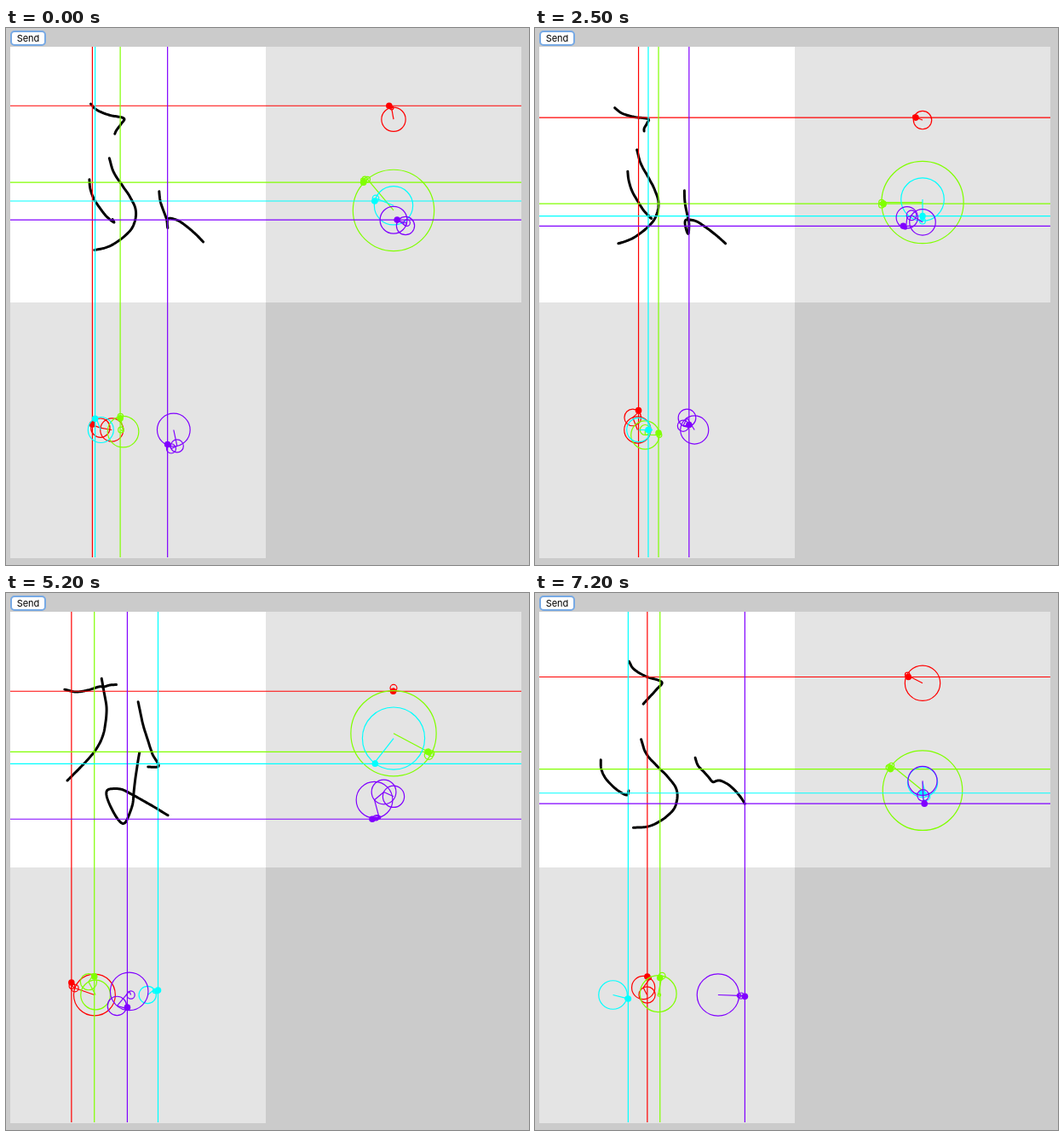
Write an HTML page with a canvas that moves like this. It is 614 px wide and 630 px high and loops after 7300 ms.

```html
<!DOCTYPE html>
<html lang="en">
<head>
<meta charset="utf-8">
<title>Stroke epicycles</title>
<style>
  html, body { margin: 0; width: 100%; height: 100%; overflow: hidden; background: #cbcbcb; }
  canvas { position: absolute; left: 0; top: 0; }
  button {
    position: absolute; left: 5px; top: 3px; width: 42px; height: 18px;
    box-sizing: border-box; margin: 0; padding: 0;
    border: 2px solid #77a9e4; border-radius: 5px; outline: none;
    background: #fff; color: #000;
    font: 11px/14px Inter, sans-serif; text-align: center;
  }
</style>
</head>
<body>
<canvas id="stage" width="614" height="630"></canvas>
<button type="button">Send</button>
<script>
const ctx = document.getElementById('stage').getContext('2d');

const STEP = 100, STEPS = 73;
const ORDER = 20, SAMPLES = 160;
const LEFT = 5, TOP = 22, SIDE = 300;
const MID_X = LEFT + SIDE * 1.5, MID_Y = TOP + SIDE * 1.5 - 0.5;
const TAU = Math.PI * 2;

// Pen phases in degrees at these times; each stroke is traced forth and back.
const TIMES = [0, 1, 2.5, 3.5, 5.2, 6.1, 7.2];

// Two poses per stroke as flat x, y lists, evenly spaced along the stroke.
const STROKES = [
  { hue: 0,
    phase: [10, 513, 1149, 1478, 2179, 2570, 2943],
    from: [120,72, 124,83, 138,94, 158,103, 149,114, 135,128, 126,136],
    to: [68,113, 82,116, 96,114, 109,110, 115,110, 122,108, 130,107.5] },
  { hue: 90,
    phase: [40, 183, 450, 618, 962, 1070, 1131],
    from: [127,187, 134,205, 149,219, 166,232, 179,247, 178,267, 164,281, 145,289, 124,288],
    to: [112,99, 115,116, 118,134, 117,151, 113.5,168, 106,183, 95.5,196, 83,209, 71,221] },
  { hue: 180,
    phase: [68, 380, 900, 1228, 1582, 1671, 1994],
    from: [59,211, 59,221.5, 63.5,230.5, 72,238, 81,242.5, 91,245, 97,238],
    to: [155,127, 157.5,139, 161,155, 166,171, 172,189, 179,203, 166,204] },
  { hue: 270,
    phase: [258, 592, 1138, 1248, 1505, 1615, 1982],
    from: [195,194, 200,201, 208,204, 216,207, 225,210, 233,212.6, 240.5,217, 248,223, 253.5,229.5, 257.5,237, 260,245],
    to: [157,185, 153.5,206.5, 150.5,228.5, 148,250, 138,270.5, 125,255, 118,233, 134,230, 153.5,239.5, 173,250.5, 192,262] }
];

const lerp = (a, b, k) => a + (b - a) * k;

// Catmull-Rom value at p in 0..1
function spline(v, p) {
  const last = v.length - 1;
  const i = Math.min(last - 1, Math.floor(p * last));
  const t = p * last - i;
  const b = v[i], c = v[i + 1];
  const a = i ? v[i - 1] : 2 * b - c;
  const d = i + 2 <= last ? v[i + 2] : 2 * c - b;
  return b + t / 2 * (c - a + t * (2*a - 5*b + 4*c - d + t * (3*(b - c) + d - a)));
}

function cosines(v) {
  return Array.from({ length: ORDER + 1 }, (_, k) => {
    let sum = 0;
    for (let j = 0; j < SAMPLES; j++) {
      const p = (j + 0.5) / SAMPLES;
      sum += spline(v, p) * Math.cos(k * p * Math.PI);
    }
    return sum * (k ? 2 : 1) / SAMPLES;
  });
}

const axis = (pts, n) => cosines(pts.filter((_, i) => i % 2 === n));
const evaluate = (c, angle) => c.reduce((s, a, k) => s + a * Math.cos(k * angle), 0);
const blend = (a, b, m) => a.map((v, k) => lerp(v, b[k], m));

for (const s of STROKES) {
  s.color = `hsl(${s.hue}, 100%, 50%)`;
  s.x = [axis(s.from, 0), axis(s.to, 0)];
  s.y = [axis(s.from, 1), axis(s.to, 1)];
}

// Steady swing between the two characters
function morphAt(t) {
  const half = 3.335;
  const d = Math.abs(t - 1.11) % (2 * half);
  return -0.045 + 0.405 * Math.min(d, 2 * half - d);
}

function phaseAt(phase, t) {
  let i = 0;
  while (i < TIMES.length - 2 && t >= TIMES[i + 1]) i++;
  const k = (t - TIMES[i]) / (TIMES[i + 1] - TIMES[i]);
  return lerp(phase[i], phase[i + 1], k) * Math.PI / 180;
}

function line(x1, y1, x2, y2) {
  ctx.beginPath();
  ctx.moveTo(x1, y1);
  ctx.lineTo(x2, y2);
  ctx.stroke();
}

function circle(x, y, r) {
  ctx.beginPath();
  ctx.arc(x, y, r, 0, TAU);
}

// Chain of circles; "upright" chains drive y, the others drive x.
function epicycles(c, angle, upright) {
  let x = upright ? MID_X : c[0];
  let y = upright ? c[0] : MID_Y;
  for (let k = 1; k < c.length; k++) {
    const along = c[k] * Math.cos(k * angle), across = c[k] * Math.sin(k * angle);
    const nx = x + (upright ? across : along);
    const ny = y + (upright ? along : across);
    circle(x, y, Math.abs(c[k]));
    ctx.stroke();
    line(x, y, nx, ny);
    x = nx;
    y = ny;
  }
  circle(x, y, 3.8);
  ctx.fill();
  return upright ? y : x;
}

function trace(cx, cy) {
  ctx.beginPath();
  for (let j = 0; j <= 100; j++) {
    const a = j / 100 * Math.PI;
    ctx.lineTo(evaluate(cx, a), evaluate(cy, a));
  }
  ctx.stroke();
}

function draw(t) {
  ctx.fillStyle = '#cbcbcb';
  ctx.fillRect(0, 0, 614, 630);
  ctx.fillStyle = '#e4e4e4';
  ctx.fillRect(LEFT + SIDE, TOP, SIDE, SIDE);
  ctx.fillRect(LEFT, TOP + SIDE, SIDE, SIDE);
  ctx.fillStyle = '#fff';
  ctx.fillRect(LEFT, TOP, SIDE, SIDE);

  const m = morphAt(t);
  const poses = STROKES.map(s => ({ s, cx: blend(...s.x, m), cy: blend(...s.y, m) }));

  ctx.lineCap = ctx.lineJoin = 'round';
  ctx.lineWidth = 3;
  ctx.strokeStyle = '#000';
  for (const { cx, cy } of poses) trace(cx, cy);

  ctx.lineCap = 'butt';
  ctx.lineWidth = 1.2;
  for (const { s, cx, cy } of poses) {
    const angle = phaseAt(s.phase, t);
    ctx.strokeStyle = ctx.fillStyle = s.color;
    const x = epicycles(cx, angle, false);
    const y = epicycles(cy, angle, true);
    line(x, TOP, x, TOP + 2 * SIDE - 1);
    line(LEFT, y, LEFT + 2 * SIDE, y);
  }
}

let shown = -1;
const start = performance.now();
function tick() {
  const step = Math.floor((performance.now() - start) / STEP) % STEPS;
  if (step !== shown) {
    shown = step;
    draw(step * STEP / 1000);
  }
  requestAnimationFrame(tick);
}
tick();
</script>
</body>
</html>
```
